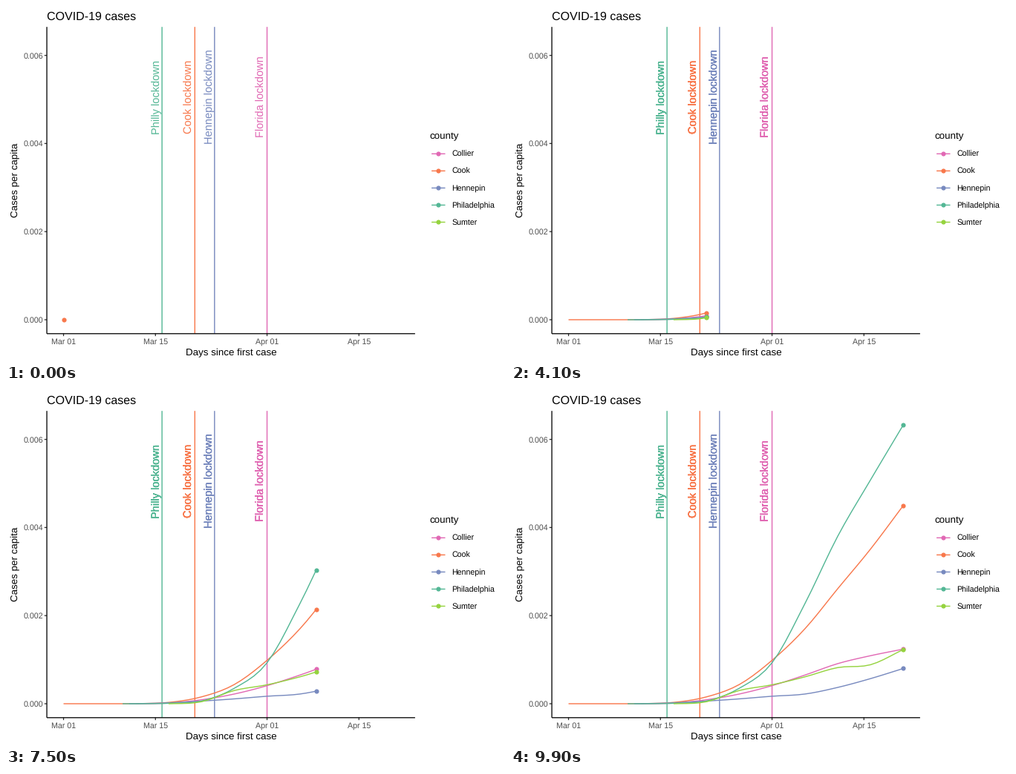
These frames come from a looping animation (672 by 480 pixels, 10 s). A matplotlib script:

```python
import matplotlib.pyplot as plt
import numpy as np
from matplotlib.animation import FuncAnimation

W, H, DPI = 672, 480, 72
FRAMES = 100
LAST_DAY = 51
LEFT, RIGHT, TOP, BOTTOM = 55, 550.9, 28.2, 441.8
SMALL, MEDIUM, LARGE = 10.67, 13.33, 16

plt.rcParams["font.family"] = ["Liberation Sans", "DejaVu Sans"]
plt.rcParams["text.hinting"] = "none"

PINK, ORANGE, BLUE = "#e169b4", "#f8784c", "#788abf"
GREEN, LIME = "#54b795", "#95d33f"

# name, colour, first day, cases per 100,000 at the key days
KEY_DAYS = np.arange(11, LAST_DAY + 1, 5)
COUNTIES = [
    ("Collier", PINK, 11, [0, 1.5, 9, 22, 41, 65, 91, 109, 124]),
    ("Cook", ORANGE, 0, [0, 3, 15.5, 43.5, 98.5, 170, 261, 351, 450]),
    ("Hennepin", BLUE, 10, [0, 2, 6, 11, 17, 22, 37, 57, 80]),
    ("Philadelphia", GREEN, 9, [0, 1, 6, 35, 93, 227, 380, 508, 633]),
    ("Sumter", LIME, 16, [0, 0, 4.5, 30, 43, 61, 82, 88.5, 123]),
]

LOCKDOWNS = [("Philly", 15, GREEN), ("Cook", 20, ORANGE),
             ("Hennepin", 23, BLUE), ("Florida", 31, PINK)]


def px(day):
    return 77.5 + 8.84 * np.asarray(day)


def py(per_100k):
    return 423 - 0.594 * np.asarray(per_100k)


def smooth(days, values):
    """Cubic Hermite curve through the values at the key days."""
    step = KEY_DAYS[1] - KEY_DAYS[0]
    v = np.asarray(values, float)
    slope = np.gradient(v)
    u = np.clip((days - KEY_DAYS[0]) / step, 0, len(v) - 1)
    i = np.minimum(u.astype(int), len(v) - 2)
    t = u - i
    rise = t * t * (3 - 2 * t)
    return (v[i] + (v[i + 1] - v[i]) * rise
            + slope[i] * t * (1 - t) ** 2 - slope[i + 1] * t * t * (1 - t))


fig = plt.figure(figsize=(W / DPI, H / DPI), dpi=DPI, facecolor="white")
ax = fig.add_axes([0, 0, 1, 1])
ax.set_xlim(0, W)
ax.set_ylim(H, 0)
ax.axis("off")


def line(xs, ys, color, lw=1.42, z=2):
    return ax.plot(xs, ys, color=color, lw=lw, zorder=z,
                   solid_capstyle="butt", snap=False)[0]


def dot(x, y, color):
    return ax.plot([x], [y], "o", color=color, ms=6.2, mew=0, zorder=5,
                   snap=False)[0]


def label(x, y, s, size, color="black", ha="left", rotation=0):
    return ax.text(x, y, s, fontsize=size, color=color, ha=ha, va="baseline",
                   rotation=rotation, rotation_mode="anchor", zorder=4)


# Axes and titles
line([LEFT, LEFT], [TOP, BOTTOM], "black", 1.29, 6)
line([LEFT, RIGHT], [BOTTOM, BOTTOM], "black", 1.29, 6)
for v in range(0, 601, 200):
    line([LEFT - 3.3, LEFT], [py(v)] * 2, "#333333", 1.29)
    label(LEFT - 5, py(v) + 3.9, f"{v / 1e5:.3f}", SMALL, "#4d4d4d", "right")
for day, name in ((0, "Mar 01"), (14, "Mar 15"), (31, "Apr 01"), (45, "Apr 15")):
    line([px(day)] * 2, [BOTTOM, BOTTOM + 3.3], "#333333", 1.29)
    label(px(day), 456.2, name, SMALL, "#4d4d4d", "center")
label(LEFT, 19.2, "COVID-19 cases", LARGE)
label((LEFT + RIGHT) / 2, 471, "Days since first case", MEDIUM, ha="center")
label(16.3, (TOP + BOTTOM) / 2, "Cases per capita", MEDIUM, ha="center",
      rotation=90)

# Legend
label(570.9, 179.2, "county", MEDIUM)
for i, (name, color, *_) in enumerate(COUNTIES):
    y = 199.3 + 23.04 * i
    line([573.1, 591.5], [y, y], color)
    dot(582.3, y, color)
    label(600.5, y + 3.9, name, SMALL)

# Lockdown markers: one text copy per county already reporting
copies = []
for place, day, color in LOCKDOWNS:
    x = px(day)
    line([x, x], [TOP, BOTTOM], color, z=1)
    copies.append([label(x - 3.2, 122.5, f"{place} lockdown", 14.6, color,
                         "center", 90) for _ in COUNTIES])

tracks = []
for _, color, first, values in COUNTIES:
    days = np.arange(first, LAST_DAY + 1)
    tracks.append((days, smooth(days, values), line([], [], color, z=3),
                   dot(0, 0, color)))


def update(frame):
    # time advances in half days
    now = round(2 * LAST_DAY * frame / (FRAMES - 1)) / 2
    alive = 0
    for days, values, path, head in tracks:
        shown = now >= days[0]
        alive += shown
        path.set_visible(shown)
        head.set_visible(shown)
        past = days < now
        value = np.interp(now, days, values)
        path.set_data(px(np.append(days[past], now)),
                      py(np.append(values[past], value)))
        head.set_data([px(now)], [py(value)])
    for stack in copies:
        for i, text in enumerate(stack):
            text.set_visible(i < alive)
    return []


anim = FuncAnimation(fig, update, frames=FRAMES, interval=100, repeat=True,
                     repeat_delay=0, init_func=lambda: update(0), blit=False)
plt.show()
```
